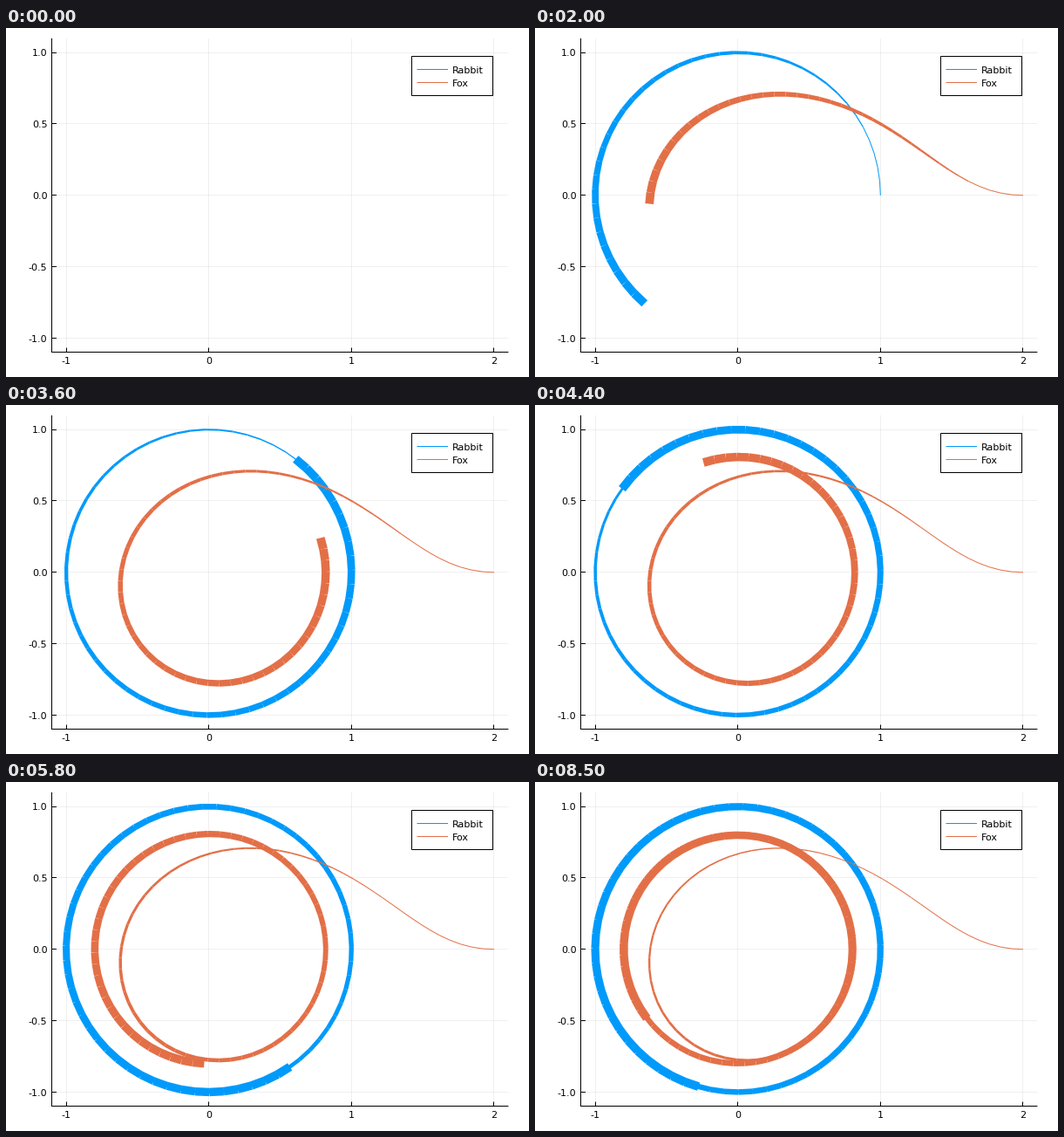
These frames come from a looping animation (600x400 px, 8.55 s). A matplotlib script:

```python
import numpy as np
import matplotlib.pyplot as plt
from matplotlib.animation import FuncAnimation
from matplotlib.collections import LineCollection
from matplotlib.patches import Rectangle

W, H, DPI = 600, 400, 100
PX = 72 / DPI                      # one pixel in points
FRAMES, STEP, SUB = 171, 0.1, 20
SPEED = 0.8                        # fox speed relative to the rabbit
BLUE, ORANGE = "#009AFA", "#E36F47"
LEFT, RIGHT, TOP, BOTTOM = 52.5, 576.4, 11.8, 371.5
CX, CY, UNIT = 232.67, 191.8, 163.65

plt.rcParams["font.family"] = "DejaVu Sans"


def rabbit(t):
    return np.array([np.cos(t), np.sin(t)])


def chase(t, p):
    d = rabbit(t) - p
    return SPEED * d / np.hypot(*d)


def fox_path():
    p, h = np.array([2.0, 0.0]), STEP / SUB
    path = [p]
    for i in range((FRAMES - 1) * SUB):
        t = i * h
        k1 = chase(t, p)
        k2 = chase(t + h / 2, p + h / 2 * k1)
        k3 = chase(t + h / 2, p + h / 2 * k2)
        k4 = chase(t + h, p + h * k3)
        p = p + h / 6 * (k1 + 2 * k2 + 2 * k3 + k4)
        if (i + 1) % SUB == 0:
            path.append(p)
    return np.array(path)


def to_px(points):
    return np.column_stack([CX + UNIT * points[:, 0], CY - UNIT * points[:, 1]])


def segments(points):
    return np.stack([points[:-1], points[1:]], axis=1)


def centre(v):
    """Middle of the pixel that holds v, for crisp lines."""
    return np.floor(v) + 0.5


fig = plt.figure(figsize=(W / DPI, H / DPI), dpi=DPI, facecolor="white")
ax = fig.add_axes([0, 0, 1, 1])
ax.set_xlim(0, W)
ax.set_ylim(H, 0)
ax.axis("off")


def line(x, y, color="black", **kw):
    ax.plot(x, y, color=color, lw=PX, solid_capstyle="butt", snap=False, **kw)


def label(x, y, s, ha, **kw):
    ax.text(x, y, s, ha=ha, va="baseline", fontsize=8, color="black", **kw)


# grid, ticks and tick labels
for v in (-1, 0, 1, 2):
    x = CX + UNIT * v
    gx = centre(x)
    line([gx, gx], [TOP, BOTTOM], alpha=0.06, zorder=1)
    line([gx, gx], [BOTTOM, BOTTOM - 5], zorder=2)
    label(x, 385, str(v), "center")
for v in (-1, -0.5, 0, 0.5, 1):
    y = CY - UNIT * v
    gy = centre(y)
    line([LEFT, RIGHT], [gy, gy], alpha=0.06, zorder=1)
    line([LEFT, LEFT + 5.5], [gy, gy], zorder=2)
    label(47.5, y + 4.2, f"{v:.1f}", "right")
line([LEFT, LEFT], [TOP, BOTTOM + 0.5], zorder=2)
line([LEFT - 0.5, RIGHT], [BOTTOM, BOTTOM], zorder=2)

# trails
trails = []
for pts, color, z in (
    (rabbit(STEP * np.arange(FRAMES)).T, BLUE, 3),
    (fox_path(), ORANGE, 4),
):
    coll = LineCollection([], colors=color, capstyle="butt", zorder=z)
    ax.add_collection(coll, autolim=False)
    trails.append((coll, segments(to_px(pts))))

# legend
ax.add_patch(Rectangle((465.5, 32.5), 93, 45, fc="white", ec="black",
                       lw=PX, snap=False, zorder=6))
for name, color, y in (("Rabbit", BLUE, 47.5), ("Fox", ORANGE, 62.5)):
    line([471.5, 507], [y, y], color, zorder=7)
    label(511.8, y + 4.4, name, "left", zorder=7)


def draw(n):
    # widths grow from the tail to the head
    widths = np.maximum(1, 10 * np.arange(max(n, 1)) / max(n, 1)) * PX
    for coll, segs in trails:
        coll.set_segments(segs[:n])
        coll.set_linewidths(widths)
    return [coll for coll, _ in trails]


anim = FuncAnimation(fig, draw, frames=FRAMES, interval=50,
                     repeat=True, repeat_delay=0, blit=False)
plt.show()
```
